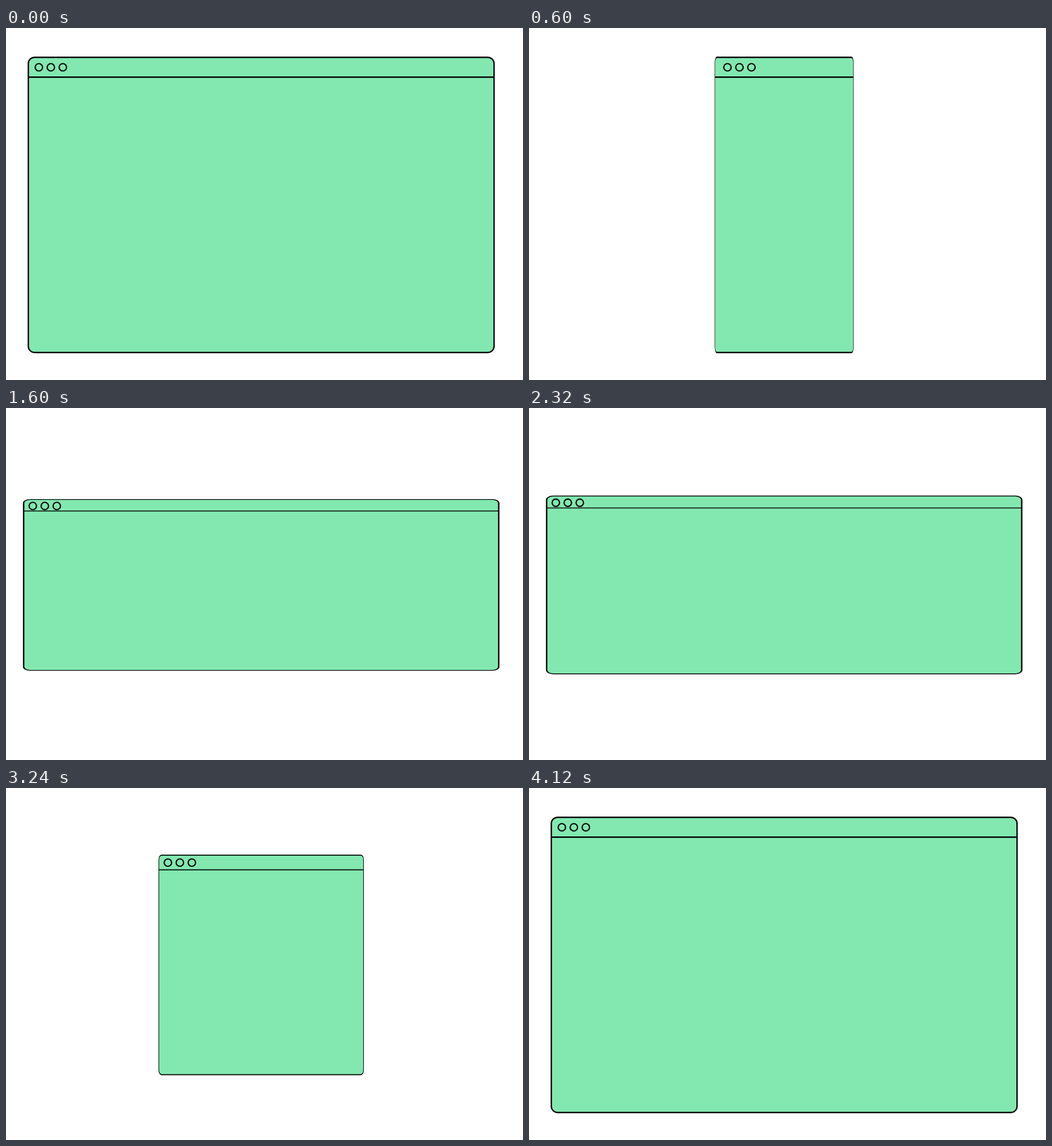
An HTML page that plays this animation: 906 by 618 pixels, repeating every 4720 ms.

```html
<!DOCTYPE html>
<html>
<head>
<meta charset="utf-8">
<style>
  html, body { margin: 0; width: 100%; height: 100%; overflow: hidden; background: #fff; }
  svg { display: block; width: 100%; height: 100%; fill: none; stroke: #000; stroke-width: 2.4; }
</style>
</head>
<body>
<svg viewBox="0 0 906 618">
  <g id="pane">
    <rect x="-408.1" y="-259.1" width="816.2" height="518.2" rx="11" fill="#82e8b0"/>
    <path d="M-408.1-224.3H408.1"/>
  </g>
  <g id="dots" stroke-width="2.2">
    <circle r="6.5"/>
    <circle cx="21" r="6.5"/>
    <circle cx="42" r="6.5"/>
  </g>
</svg>
<script>
const LOOP = 4720, STEP = 40;
const pane = document.getElementById('pane');
const dots = document.getElementById('dots');

// Poses: x scale, y scale, first dot x, dots y
const full = [1, 1, 57.6, 69];
const narrow = [0.2975, 1, 347.8, 69];
const flat = [1.02, 0.579, 47, 172];
const wide = [1.02, 0.744, 47, 132];
const square = [0.4395, 0.744, 283.7, 131];

// Linear moves: start, end, pose reached
const moves = [
  [80, 600, narrow],
  [1120, 1600, flat],
  [2280, 2560, wide],
  [2800, 3240, square],
  [3680, 4120, full],
];

function poseAt(t) {
  let pose = full;
  for (const [start, end, next] of moves) {
    if (t <= start) break;
    const k = Math.min(1, (t - start) / (end - start));
    pose = pose.map((v, i) => v + (next[i] - v) * k);
  }
  return pose;
}

function draw(now) {
  const t = Math.floor((now % LOOP) / STEP) * STEP;
  const [sx, sy, x, y] = poseAt(t);
  pane.setAttribute('transform', `translate(447.2 310.6) scale(${sx} ${sy})`);
  dots.setAttribute('transform', `translate(${x} ${y})`);
}

let origin;
function tick(now) {
  origin ??= now;
  draw(now - origin);
  requestAnimationFrame(tick);
}
draw(0);
requestAnimationFrame(tick);
</script>
</body>
</html>
```
